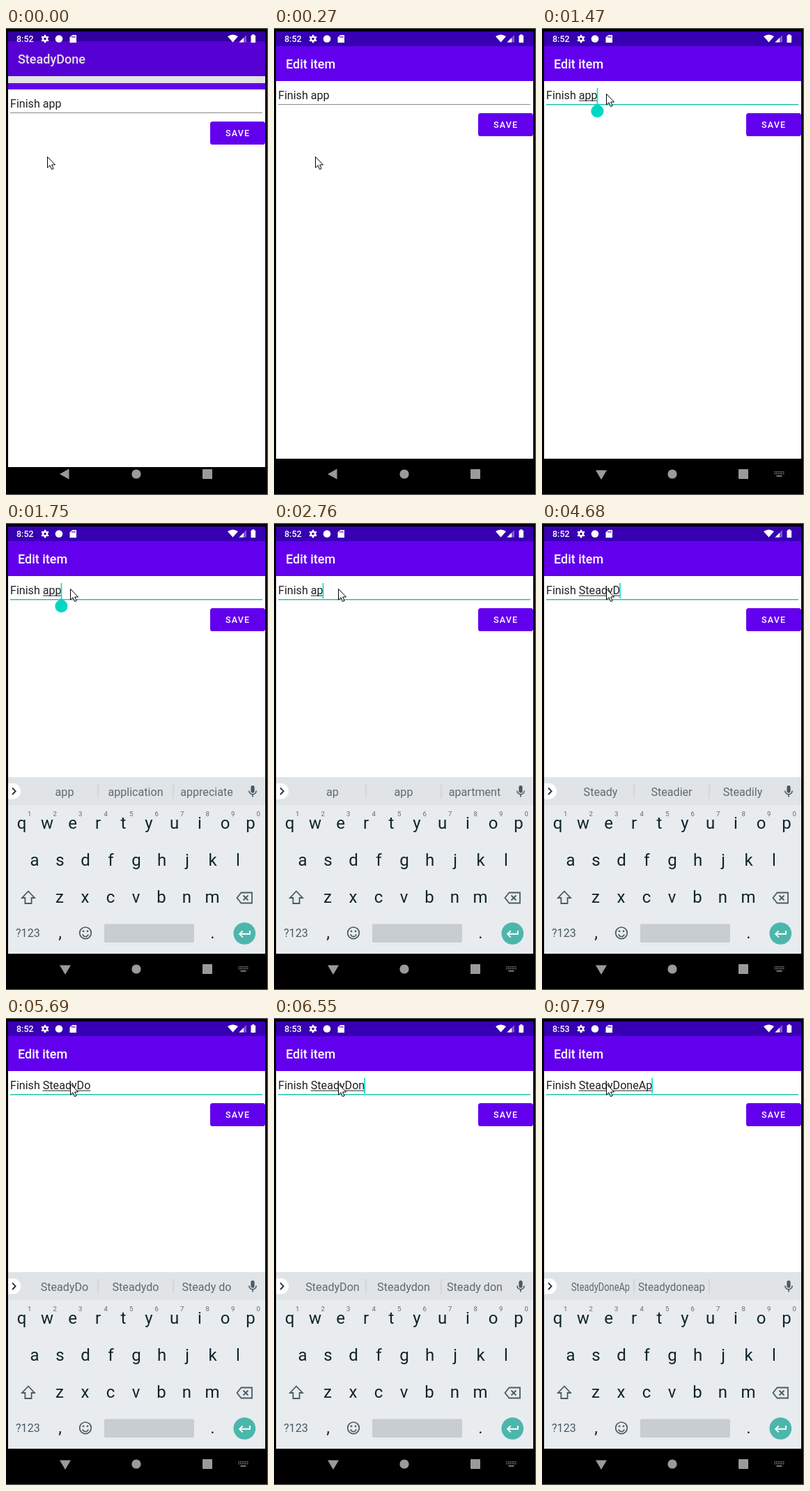
These frames come from a looping animation (376 by 669 pixels, 8 s). An HTML page with a canvas:

```html
<!DOCTYPE html>
<html lang="en">
<head>
<meta charset="utf-8">
<title>Edit item</title>
<style>
html, body { margin: 0; width: 100%; height: 100%; overflow: hidden; background: #000; }
canvas { display: block; width: 376px; height: 669px; }
</style>
</head>
<body>
<canvas id="stage"></canvas>
<script>
const W = 376, H = 669, LOOP = 8000;
const cv = document.getElementById('stage');
const g = cv.getContext('2d');
const dpr = window.devicePixelRatio || 1;
cv.width = W * dpr;
cv.height = H * dpr;

const PURPLE = '#6200ee', DARK = '#3700b3', TEAL = '#03dac5';
const INK = '#212121', ICON = '#4a5a63', GREY = '#9a9a9a';

// time, typed word, suggestions (null keeps the last ones), caret shown
const STEPS = [
  [0, 'app', ['app', 'application', 'appreciate'], 1],
  [1890, 'app', null, 0],
  [2460, 'ap', null, 1],
  [2624, 'ap', ['ap', 'app', 'apartment'], 1],
  [2788, 'a', null, 1],
  [2952, 'a', ['a', 'and', 'all'], 1],
  [3116, '', null, 1],
  [3280, '', ['the', 'your', 'my'], 1],
  [3530, 'S', ['S', '*Some', 'School'], 1],
  [3660, 'St', null, 1],
  [3790, 'Ste', ['St', '*Still', 'Street'], 1],
  [3920, 'Stea', ['Ste', '*Step', 'Steve'], 1],
  [4050, 'Stead', ['Stea', '*Steak', 'Steam'], 1],
  [4180, 'Steady', ['Stead', '*Steady', 'Steadily'], 1],
  [4310, 'Steady', ['Steady', 'Steadier', 'Steadily'], 1],
  [4680, 'SteadyD', null, 1],
  [4830, 'SteadyD', ['SteadyD', 'Steadyd', 'Steady do'], 1],
  [5390, 'SteadyDo', null, 1],
  [5540, 'SteadyDo', ['SteadyDo', 'Steadydo', 'Steady do'], 1],
  [5690, 'SteadyDo', null, 0],
  [5970, 'SteadyDo', null, 1],
  [6270, 'SteadyDo', null, 0],
  [6550, 'SteadyDon', ['SteadyDon', 'Steadydon', 'Steady don'], 1],
  [6950, 'SteadyDone', null, 1],
  [7080, 'SteadyDone', ['SteadyDone', 'Steadydone', 'Steady don'], 1],
  [7220, 'SteadyDone', null, 0],
  [7670, 'SteadyDoneA', null, 1],
  [7790, 'SteadyDoneAp', ['SteadyDoneAp', 'Steadydoneap', ''], 1]
];

function stateAt(t) {
  const s = {};
  for (const [at, word, sug, caret] of STEPS) {
    if (at > t) break;
    s.word = word;
    s.caret = caret;
    if (sug) s.sug = sug;
  }
  return s;
}

function rect(x, y, w, h, color) {
  g.fillStyle = color;
  g.fillRect(x, y, w, h);
}

function rounded(x, y, w, h, r, color) {
  g.fillStyle = color;
  g.beginPath();
  g.roundRect(x, y, w, h, r);
  g.fill();
}

function disc(x, y, r, color) {
  g.fillStyle = color;
  g.beginPath();
  g.arc(x, y, r, 0, 7);
  g.fill();
}

function trace(pts, closed) {
  g.beginPath();
  for (let i = 0; i < pts.length; i += 2) g.lineTo(pts[i], pts[i + 1]);
  if (closed) g.closePath();
}

function poly(color, ...pts) {
  trace(pts, true);
  g.fillStyle = color;
  g.fill();
}

function line(color, width, closed, ...pts) {
  trace(pts, closed);
  g.strokeStyle = color;
  g.lineWidth = width;
  g.stroke();
}

function text(str, x, y, size, color, weight = 400, align = 'left', max) {
  g.font = `${weight} ${size}px Roboto, sans-serif`;
  g.fillStyle = color;
  g.textAlign = align;
  if (max) g.fillText(str, x, y, max);
  else g.fillText(str, x, y);
}

function frame() {
  rect(0, 0, W, H, '#000');
  rect(0, 0, W, 1, '#6a6a6a');
  rect(W - 1, 0, 1, H, '#6a6a6a');
  rect(0, H - 1, W, 1, '#6a6a6a');
}

function windowBars(title) {
  rect(3, 76, 369, 541, '#fff');
  rect(3, 5, 369, 21, DARK);
  rect(3, 26, 369, 50, PURPLE);
  text(title, 17, 58, 18, '#fff', 500);
}

function field(s, focused, handle) {
  const base = 102, x = 6;
  text('Finish ' + s.word, x, base, 16.1, INK);
  const start = x + g.measureText('Finish ').width;
  const end = x + g.measureText('Finish ' + s.word).width;
  if (!focused) {
    rect(6, 109, 362, 1, '#8a8a8a');
    return;
  }
  rect(6, 109, 362, 1.4, '#14bfae');
  if (s.word) rect(start, 103.6, end - start, 1, INK);
  if (s.caret) rect(end - 0.9, 86, 1.6, 22, TEAL);
  if (handle) {
    disc(end - 0.2, 119.2, 9, '#00d7c3');
    poly('#00d7c3', end - 0.2, 107.5, end + 6.4, 113.2, end - 6.8, 113.2);
  }
}

function saveButton() {
  rounded(293, 122, 79, 33, 3.6, PURPLE);
  g.letterSpacing = '1.12px';
  text('SAVE', 315, 143, 12.57, '#fff', 500);
  g.letterSpacing = '0px';
}

function editWindow(s, focused, handle) {
  windowBars('Edit item');
  field(s, focused, handle);
  saveButton();
}

// The new window slides up and is revealed from below over the dimmed old one.
function opening(s, rise, drop, top) {
  g.save();
  g.beginPath();
  g.rect(3, 5, 369, 659);
  g.clip();
  g.save();
  g.translate(0, -rise);
  windowBars('SteadyDone');
  g.restore();
  rect(3, 5, 369, 612, 'rgba(0,0,0,.11)');
  g.beginPath();
  g.rect(3, top, 369, 659);
  g.clip();
  g.translate(0, drop);
  editWindow(s, false, false);
  g.restore();
}

function statusIcons(t) {
  const c = '#fff';
  text(t < 6120 ? '8:52' : '8:53', 15, 20, 12.5, c, 500);
  g.strokeStyle = c;
  g.lineWidth = 2.4;
  g.beginPath();
  g.arc(56, 15.5, 3, 0, 7);
  g.stroke();
  for (let i = 0; i < 6; i++) {
    const a = Math.PI / 6 + i * Math.PI / 3;
    const cx = Math.cos(a), cy = Math.sin(a);
    line(c, 2.4, false, 56 + 3 * cx, 15.5 + 3 * cy, 56 + 5.7 * cx, 15.5 + 5.7 * cy);
  }
  disc(76, 15.5, 5.3, c);
  poly(c, 95, 10, 101, 10, 101, 21, 91.5, 21, 91.5, 13.5);
  for (let i = 0; i < 3; i++) rect(94.4 + i * 2, 11.5, 1, 2.5, DARK);
  g.fillStyle = c;
  g.beginPath();
  g.moveTo(325.5, 20.5);
  g.lineTo(318, 12);
  g.quadraticCurveTo(325.5, 6.8, 333, 12);
  g.fill();
  poly('rgba(255,255,255,.35)', 345, 10, 345, 20.5, 334.5, 20.5);
  poly(c, 341, 14, 341, 20.5, 334.5, 20.5);
  rounded(351.5, 10.4, 6.6, 10.6, 0.8, c);
  rect(353.3, 9.2, 3, 2, c);
}

function navIcons(typing) {
  if (typing) poly(GREY, 77, 633.5, 93, 633.5, 85, 647);
  else poly(GREY, 90.5, 631.5, 90.5, 646.5, 77, 639);
  disc(187, 639, 6.6, GREY);
  rounded(282, 632, 14, 14, 0.8, GREY);
  if (!typing) return;
  for (let r = 0; r < 2; r++)
    for (let i = 0; i < 6; i++) rect(333.5 + i * 2.5, 635.2 + r * 2.7, 1.4, 1.4, GREY);
  rect(336.5, 641, 8, 1.5, GREY);
}

function suggestions(sug) {
  rect(3, 364, 369, 40, '#e0e4e7');
  g.save();
  g.beginPath();
  g.rect(3, 364, 369, 40);
  g.clip();
  rounded(-10, 373, 31, 22.5, 11, '#fff');
  g.restore();
  line('#263238', 1.8, false, 9, 379.5, 13.7, 384.2, 9, 389);
  rect(131.5, 374, 1, 21, '#c3c9cc');
  rect(239.5, 374, 1, 21, '#c3c9cc');
  sug.forEach((w, i) => {
    const strong = w[0] === '*';
    text(strong ? w.slice(1) : w, 84 + 102 * i, 390.5, 16.1,
      strong ? '#000' : '#5e6a70', strong ? 700 : 400, 'center', i === 1 ? 96 : 84);
  });
  rounded(351.4, 376, 5.2, 10.5, 2.6, ICON);
  g.strokeStyle = ICON;
  g.lineWidth = 1.5;
  g.beginPath();
  g.arc(354, 383.5, 5.2, 0, Math.PI);
  g.stroke();
  rect(353.2, 388.5, 1.6, 4, ICON);
}

function keyRow(keys, x, y) {
  [...keys].forEach((k, i) => text(k, x + 36.5 * i, y, 24, '#10242c', 400, 'center'));
}

function keyboard(sug) {
  rect(3, 404, 369, 213, '#e8ecef');
  suggestions(sug);
  keyRow('qwertyuiop', 22.5, 438);
  [...'1234567890'].forEach((n, i) => text(n, 33.8 + 36.5 * i, 420, 9.6, '#5e6a70', 400, 'center'));
  keyRow('asdfghjkl', 41, 490.5);
  keyRow('zxcvbnm', 77, 543.5);
  text('?123', 14, 593, 16.1, ICON);
  text(',', 77.5, 595, 24, '#10242c', 400, 'center');
  text('.', 296.5, 595, 24, '#10242c', 400, 'center');

  // shift and backspace
  line(ICON, 1.8, true, 32, 527.5, 41, 537, 36.6, 537, 36.6, 545, 27.4, 545, 27.4, 537, 23, 537);
  line(ICON, 1.8, true, 331.5, 537, 337.5, 529.5, 353, 529.5, 353, 544.5, 337.5, 544.5);
  line(ICON, 1.8, false, 340.5, 533.5, 347.5, 540.5);
  line(ICON, 1.8, false, 347.5, 533.5, 340.5, 540.5);

  // emoji
  g.strokeStyle = ICON;
  g.lineWidth = 1.7;
  g.beginPath();
  g.arc(114, 587.3, 8.3, 0, 7);
  g.stroke();
  disc(111, 584.8, 1.4, ICON);
  disc(117, 584.8, 1.4, ICON);
  g.beginPath();
  g.arc(114, 588, 4.4, 0.3, Math.PI - 0.3);
  g.stroke();

  rounded(141, 574.5, 129, 26.5, 2, '#c8cdd1');
  disc(342.3, 588, 15.8, '#4db6ac');
  line('#fff', 1.9, false, 350, 584, 350, 588.8, 335.5, 588.8);
  line('#fff', 1.9, false, 339.7, 584.3, 335.2, 588.8, 339.7, 593.3);
}

function pointer(t) {
  const k = t < 550 ? 0 : Math.min(6, Math.floor((t - 550) / 131.4) + 1) / 6;
  const e = k * k * (3 - 2 * k);
  g.save();
  g.translate(59.5 + 33 * e, 184.5 - 90 * e);
  const shape = [0, 0, 0, 15.5, 3.6, 12.3, 6, 18, 8.6, 17, 6.2, 11.5, 11, 11.5];
  poly('#fff', ...shape);
  line('#000', 1, true, ...shape);
  g.restore();
}

function draw(t) {
  const s = stateAt(t);
  const focused = t >= 1340;
  g.setTransform(dpr, 0, 0, dpr, 0, 0);
  frame();
  if (t < 150) opening(s, 7, 12, 79);
  else if (t < 270) opening(s, 11, 3, 5);
  else editWindow(s, focused, t >= 1470 && t < 2460);
  statusIcons(t);
  if (t >= 1750) keyboard(s.sug);
  navIcons(t >= 1470);
  pointer(t);
}

const begin = performance.now();
function tick() {
  draw((performance.now() - begin) % LOOP);
  requestAnimationFrame(tick);
}
tick();
</script>
</body>
</html>
```
